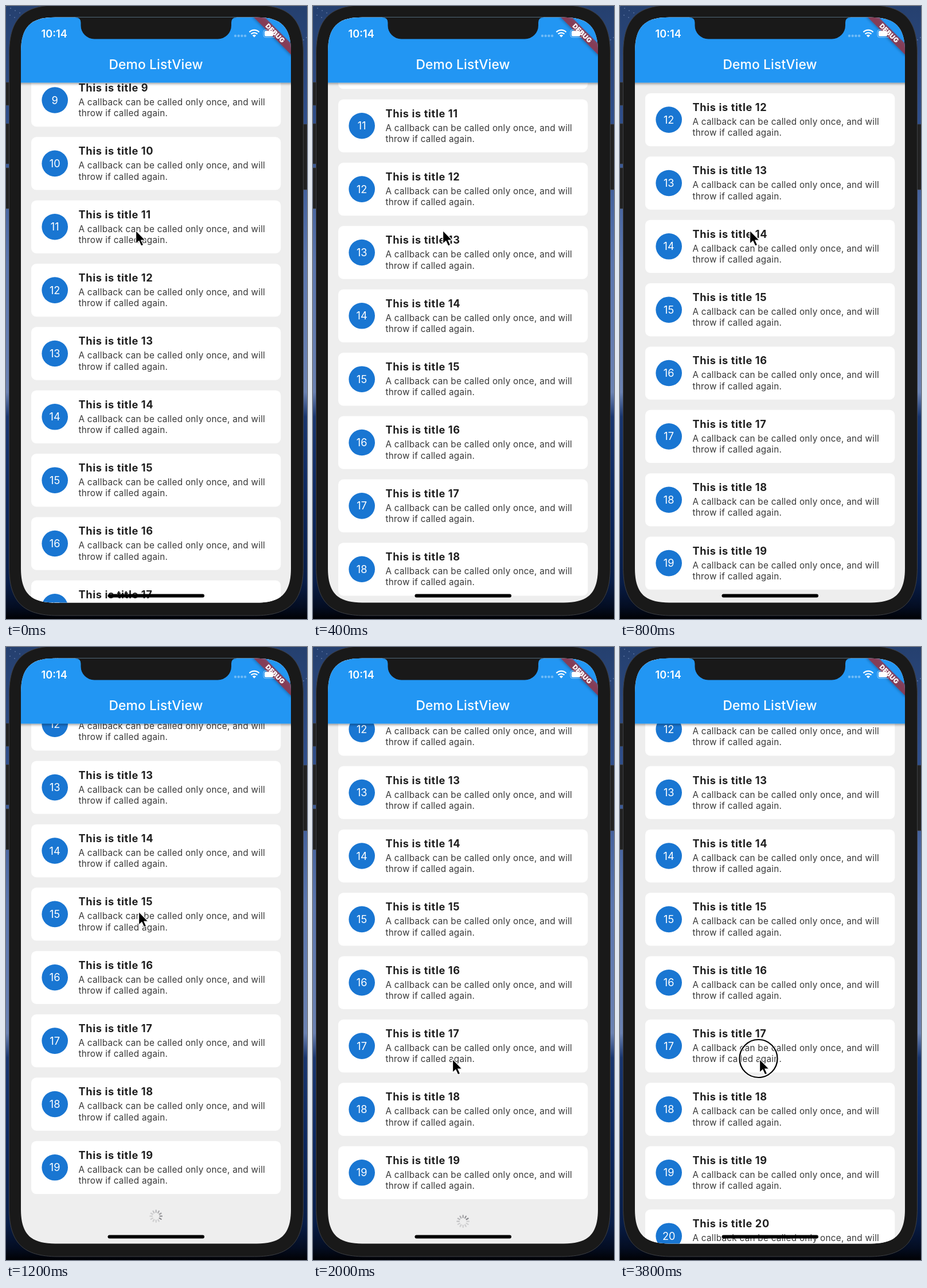
An HTML page that plays this animation: 525x1068 px, repeating every 4000 ms.

```html
<!DOCTYPE html>
<html lang="en">
<head>
<meta charset="utf-8">
<title>Demo ListView</title>
<style>
  html, body { margin: 0; width: 100%; height: 100%; overflow: hidden; background: #000; }
  svg { display: block; width: 525px; height: 1068px; font-family: Inter, sans-serif; }
  .title { font-size: 18.2px; font-weight: 700; letter-spacing: .62px; fill: #1f1f1f; }
  .body { font-size: 15.3px; letter-spacing: .25px; fill: #383838; }
  .number { font-size: 18.2px; fill: #fff; text-anchor: middle; }
</style>
</head>
<body>
<svg viewBox="0 0 525 1068">
  <defs>
    <linearGradient id="sky" x2="0" y2="1">
      <stop offset="0" stop-color="#25406f"/>
      <stop offset=".2" stop-color="#304f8c"/>
      <stop offset=".42" stop-color="#5b76ae"/>
      <stop offset=".63" stop-color="#6b82b2"/>
      <stop offset=".67" stop-color="#19366f"/>
      <stop offset=".8" stop-color="#0c2860"/>
      <stop offset=".94" stop-color="#081d47"/>
      <stop offset=".98" stop-color="#040d22"/>
      <stop offset="1" stop-color="#010205"/>
    </linearGradient>
    <clipPath id="screen"><path id="glass"/></clipPath>
    <filter id="shadow" x="-20%" y="-50%" width="140%" height="200%">
      <feDropShadow dx="0" dy="2" stdDeviation="2" flood-opacity=".4"/>
    </filter>
  </defs>

  <rect width="525" height="1068" fill="url(#sky)"/>
  <g id="stars" fill="#8fa3cc"></g>
  <g fill="#222" stroke="#444" stroke-width=".7">
    <rect x="-4" y="133" width="12" height="40" rx="2"/>
    <rect x="-4" y="205" width="12" height="70" rx="2"/>
    <rect x="-4" y="282" width="12" height="71" rx="2"/>
    <rect x="515" y="206" width="14" height="114" rx="2"/>
  </g>
  <path id="shell" fill="#191919" stroke="#3d3f43"/>

  <g clip-path="url(#screen)">
    <rect x="26" y="19" width="471" height="1021" fill="#eee"/>
    <g id="list"></g>
    <rect x="20" y="10" width="483" height="123.5" fill="#2196f3" filter="url(#shadow)"/>
    <text x="261.5" y="110" font-size="22.8" font-weight="500" letter-spacing=".15" fill="#fff" text-anchor="middle">Demo ListView</text>
    <g transform="translate(469.6 47.4) rotate(45)">
      <rect x="-48" y="-6.8" width="96" height="13.6" fill="#b71c1c" fill-opacity=".63" filter="url(#shadow)"/>
      <text y="4.2" font-size="11.6" font-weight="900" letter-spacing=".4" fill="#fff" text-anchor="middle">DEBUG</text>
    </g>
    <path d="M121 19V20Q130.5 20 130.5 29V34A23.5 23.5 0 0 0 154 57.5H369.5A23.5 23.5 0 0 0 393 34V29Q393 20 402 20V19Z" fill="#191919"/>
    <text x="61.5" y="54.5" font-size="18.2" font-weight="600" fill="#fff">10:14</text>
    <g fill="#fff">
      <g id="signal" opacity=".35"></g>
      <path d="M433 54.5l-3.2-3.3a4.6 4.6 0 0 1 6.4 0z"/>
      <rect x="451" y="43.2" width="15" height="9.6" rx="2"/>
      <path d="M471.5 45.5q2 2.5 0 5z" opacity=".5"/>
    </g>
    <g fill="none" stroke="#fff">
      <path d="M427.5 48.8a7.8 7.8 0 0 1 11 0M424.5 45.5a12 12 0 0 1 17 0" stroke-width="2.3"/>
      <rect x="449" y="41.3" width="21" height="13.4" rx="3.8" opacity=".5"/>
    </g>
    <rect x="177.5" y="1024.5" width="168.5" height="6" rx="3"/>
  </g>

  <g id="ring" fill="none">
    <circle cx="241.5" cy="717" r="33" stroke="#fff" stroke-width="4.5"/>
    <circle cx="241.5" cy="717" r="33" stroke="#000" stroke-width="2.2"/>
  </g>
  <path id="cursor" d="M0 0V23.5L5.3 18.6L9.3 27.2L13.3 25.4L9.5 17.2H16.8Z" stroke="#fff" stroke-width="1.3"/>
</svg>

<script>
const LOOP = 4000, STEP = 200, PITCH = 110.36, FIRST = 8, LAST = 20;
const byId = id => document.getElementById(id);
const range = (n, make) => Array.from({ length: n }, (_, i) => make(i)).join('');

// Top edge of card 12 and cursor tip at each step; the last value holds.
const scrollSteps = [449, 353, 273, 207, 152, 110, 88.2, 92, 95.7, 97.2];
const cursorSteps = [[226.5, 391], [226.5, 391], [226.5, 391], [226.5, 391], [226.5, 391],
                     [226.5, 391], [231.5, 461], [239, 610], [243.5, 718]];
const hold = (steps, i) => steps[Math.min(i, steps.length - 1)];

// Rectangle with continuous corners: each curve spans e, with its handles c from the corner.
const smoothRect = (x, y, w, h, e, c) => `M${x} ${y + e}
  c0 ${c - e} ${c} ${-e} ${e} ${-e} h${w - 2 * e}
  c${e - c} 0 ${e} ${c} ${e} ${e} v${h - 2 * e}
  c0 ${e - c} ${-c} ${e} ${-e} ${e} h${2 * e - w}
  c${c - e} 0 ${-e} ${-c} ${-e} ${-e}z`;

const card = n => `<g id="card${n}" transform="translate(0 ${(n - 12) * PITCH})">
  <rect x="44" width="435.3" height="92.3" rx="9" fill="#fff"/>
  <circle cx="85.2" cy="46.1" r="22.8" fill="#1976d2"/>
  <text class="number" x="85.2" y="52.6">${n}</text>
  <text class="title" x="126.5" y="31">This is title ${n}</text>
  <text class="body" x="126.5" y="55">A callback can be called only once, and will</text>
  <text class="body" x="126.5" y="74.3">throw if called again.</text></g>`;

const tick = i => `<rect x="-1.1" y="-11.4" width="2.2" height="5.7" rx="1.1"
  fill="#3c3c44" transform="rotate(${i * 30})"/>`;

byId('shell').setAttribute('d', smoothRect(5.5, -1.5, 513, 1063.5, 85, 24));
byId('glass').setAttribute('d', smoothRect(26, 19.7, 471, 1019.8, 60, 16.8));
byId('list').innerHTML = range(LAST - FIRST + 1, i => card(FIRST + i)) +
  `<g id="spinner" transform="translate(261.7 903.5)">${range(12, tick)}</g>`;
byId('signal').innerHTML = range(4, i => `<circle cx="${400 + i * 5.7}" cy="52" r="2.2"/>`);
byId('stars').innerHTML = range(14, i =>
  `<circle cx="${i % 2 ? 525 - i * 37 % 23 : i * 29 % 25}" cy="${i * 47 % 90}" r=".7"/>`);

const ticks = [...byId('spinner').children];

function draw(now) {
  const step = Math.floor(now % LOOP / STEP), t = step * STEP;
  const loaded = t >= 3000;
  byId('list').setAttribute('transform', `translate(0 ${hold(scrollSteps, step)})`);
  byId('cursor').setAttribute('transform', `translate(${hold(cursorSteps, step)})`);
  byId('card20').style.display = loaded ? '' : 'none';
  byId('spinner').style.display = loaded ? 'none' : '';
  byId('ring').style.display = t >= 3800 ? '' : 'none';

  const head = Math.floor(t % 1000 / 1000 * 12) + 2;
  ticks.forEach((el, i) => {
    const age = (head - i + 24) % 12;
    el.setAttribute('opacity', Math.max(.18, .58 - age * .066));
  });
}

const start = performance.now();
function frame() {
  draw(performance.now() - start);
  requestAnimationFrame(frame);
}
frame();
</script>
</body>
</html>
```
